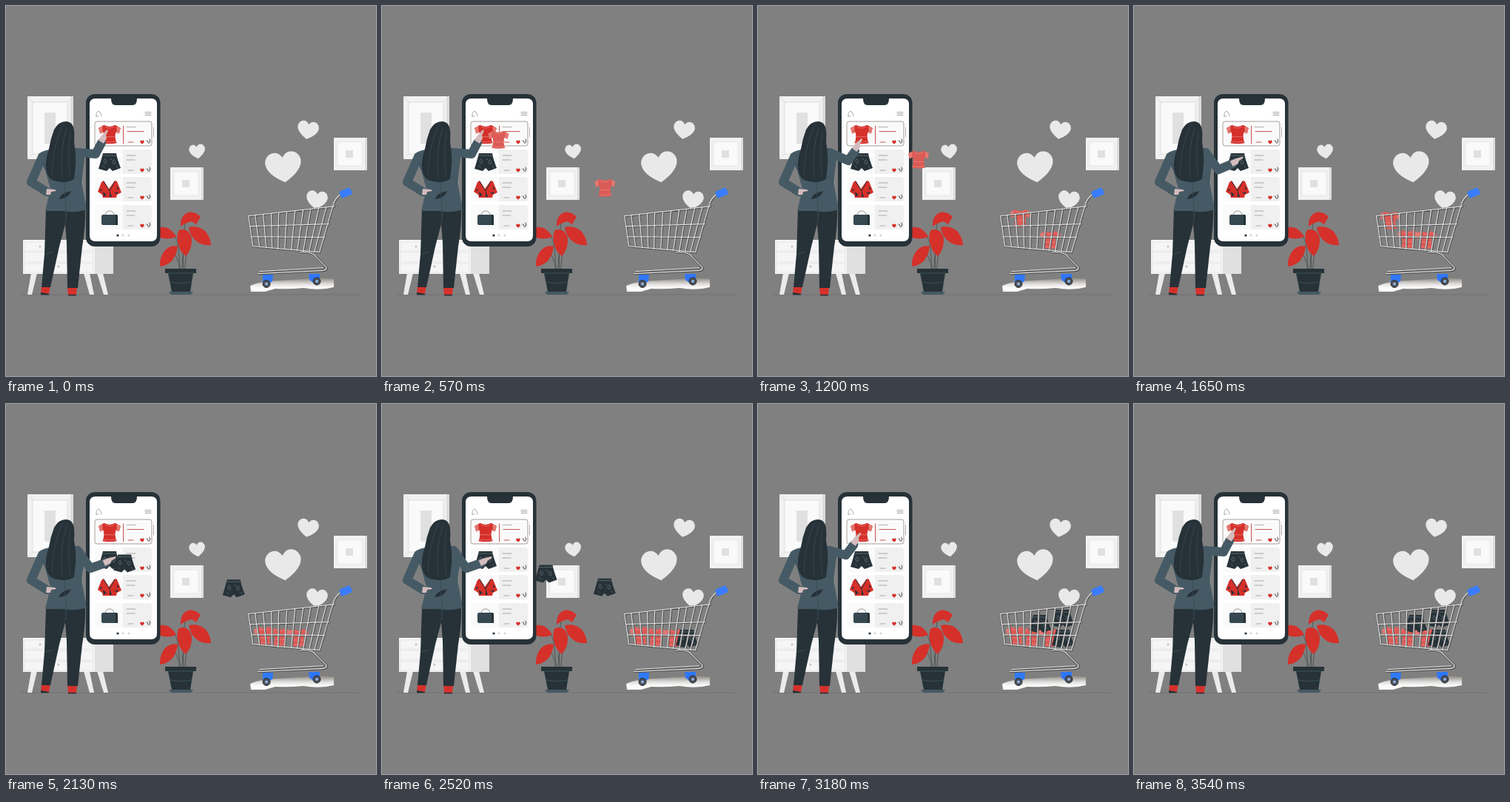
These frames come from a looping animation (500 px wide and 500 px high, 4.53 s). An HTML page without scripts:

```html
<!DOCTYPE html>
<html lang="en">
<head>
<meta charset="utf-8">
<title>Shopping from a phone</title>
<style>
html, body { margin: 0; width: 100%; height: 100%; overflow: hidden; background: #808080; }
svg { display: block; width: 100vw; height: 100vh; }
.dark { fill: #263238; }
.red { fill: #d5302a; }
.pale { fill: #e9e9e9; }
.frame { fill: #f1f1f1; }
.line { fill: none; stroke-linecap: round; stroke-linejoin: round; }
.sleeve { stroke: #455a64; stroke-width: 12; }
.under { stroke: #484848; stroke-width: 2.5; }
.over { stroke: #dedede; stroke-width: 1.3; }
.skin { fill: #d3bcbd; }
</style>
</head>
<body>
<svg viewBox="0 0 500 500" xmlns="http://www.w3.org/2000/svg">
<defs>
  <linearGradient id="shade" x2="0" y2="1">
    <stop offset="0" stop-color="#8c8782"/>
    <stop offset=".45" stop-color="#e2e0de"/>
    <stop offset=".7" stop-color="#fafafa"/>
  </linearGradient>
  <path id="heart" d="M0 10C-7 6-11.500 1-11-4C-10-10-3-12 0-6C3-12 10-10 11-4C11.500 1 7 6 0 10Z"/>
  <g id="shirt">
    <path d="M-14-8L-7-12Q0-8 7-12L14-8L12-1L8-3Q6 4 9 11Q0 13-9 11Q-6 4-8-3L-12-1Z"/>
    <path d="M-14-8L-9-11L-9-3L-12-1ZM14-8L9-11L9-3L12-1Z" fill="#e57973"/>
    <path class="line" d="M-6-10Q0-6 6-10M-7 3H7M-8 9Q0 11 8 9" stroke="#f08d88" stroke-width=".6"/>
  </g>
  <g id="shorts">
    <path class="dark" d="M-9-12H9Q10-5 15 8L4 12L0 8L-4 12L-15 9Q-11-4-9-12Z"/>
    <path class="line" d="M-9-9H9M-6-4l2 3-2 3-2-3zM6-3l2 3-2 3-2-3zM-9 5l2 2M1-5l2 2M9 5l2 2" stroke="#78878e" stroke-width=".6"/>
  </g>
  <g id="picture">
    <path class="frame" d="M0 0H45V44H0Z"/>
    <path d="M42 0H45V44H42Z" fill="#dcdcdc"/>
    <path d="M5 6H38V38H5Z" fill="#fafafa" stroke="#e0e0e0" stroke-width=".7"/>
    <path d="M16 17H26V27H16Z" fill="#e0e0e0"/>
  </g>
  <g id="card">
    <rect width="77" height="33" rx="3" fill="#fafafa"/>
    <path d="M38 0H74Q77 0 77 3V30Q77 33 74 33H38Z" fill="#f0f0f0"/>
    <path class="line" d="M43 8H55M43 14H54M45 28H52" stroke="#999" stroke-width=".8"/>
    <use href="#heart" class="red" transform="translate(64 28) scale(.25)"/>
    <path class="line" d="M70 26h1l1 3h2l1-3M74 24v2" stroke="#333" stroke-width=".8"/>
  </g>
  <path id="cart" class="line" d="M328 284L444 271M330 298L437 295M332 312L431 313M334 325L424 333M328 284L334 325
    M337 283L343 326M348 282L352 327M359 281L360 328M369 280L368 329M380 278L377 329M391 277L386 330M402 276L394 331M412 275L402 332M423 274L410 332M433 273L417 333
    M454 254Q445 259 442 271L424 333M398 333Q414 332 419 339L433 353Q435 358 427 358L341 362M343 359L429 354"/>
</defs>

<path d="M20 390H478" stroke="#6d6d6d" stroke-width=".8"/>

<g id="wall">
  <path class="frame" d="M29 122H91V207H29Z"/>
  <path d="M87 122H91V207H87Z" fill="#dcdcdc"/>
  <path d="M36 130H83V200H36Z" fill="#fafafa" stroke="#dedede"/>
  <path d="M29 122L36 130M91 122L83 130M29 207L36 200" stroke="#dedede"/>
  <path d="M52 144H67V186H52Z" fill="#e0e0e0"/>
  <use href="#picture" x="222" y="218"/>
  <use href="#picture" x="443" y="178"/>
  <g class="pale">
    <use href="#heart" transform="translate(258.500 196.500) rotate(-8) scale(.98)"/>
    <use href="#heart" transform="translate(375 217.500) rotate(-6) scale(2.200 2.080)"/>
    <use href="#heart" transform="translate(408 167.500) rotate(9) scale(1.300 1.230)"/>
    <use href="#heart" transform="translate(420 262) rotate(7) scale(1.300 1.250)"/>
  </g>
</g>

<g id="cabinet">
  <path d="M34 361H42L35 390H29ZM105 361H113L119 390H113ZM123 361H131L138 390H132Z" fill="#ebebeb"/>
  <path d="M23 316H121V362H23Z" fill="#f5f5f5"/>
  <path d="M120 316H145V362H120Z" fill="#e0e0e0"/>
  <path class="line" d="M25 319H118V331H25ZM25 333H118V346H25ZM25 348H118V360H25Z" stroke="#dedede" stroke-width=".7"/>
  <g fill="#c4c4c4"><circle cx="46" cy="325" r="1.500"/><circle cx="71" cy="352" r="1.500"/></g>
</g>

<g id="plant">
  <path class="line" d="M234 355Q235 325 229 312M238 355Q238 340 241 325M242 355Q243 320 254 306M236 355Q232 338 224 331M240 355Q238 318 242 294" stroke="#46504f" stroke-width=".8"/>
  <g class="red">
    <path d="M236 298C235 280 250 272 263 285L261 288L257 295L251 291Q242 293 236 298Z"/>
    <path d="M247 299C260 296 275 302 277 323C261 325 249 314 247 299Z"/>
    <path d="M233 304C240 299 251 304 251 318Q251 329 243 338C233 331 229 315 233 304Z"/>
    <path d="M232 325C221 321 207 332 208 352C223 350 230 340 232 325Z"/>
    <path d="M203 300Q221 295 230 312Q215 318 204 310Z"/>
  </g>
  <path d="M220 386H253L250 390H223Z" fill="#455a64"/>
  <path class="dark" d="M215 355H257V361H253L249 386H224L219 361H215Z"/>
  <path d="M222 373Q236 376 251 373M219 361H253" class="line" stroke="#455a64" stroke-width=".8"/>
</g>

<g id="phone">
  <rect class="dark" x="108" y="119" width="100.500" height="206" rx="12"/>
  <path d="M121 125H142Q142 134 148 134H171Q177 134 177 125H196Q204 125 204 133V310Q204 318 196 318H121Q113 318 113 310V133Q113 125 121 125Z" fill="#fff"/>
  <path class="line" d="M122 149V145Q125 139 128 145L129 149M125 149h-3M188 143.500H196M188 145.500H196M188 147.500H196" stroke="#777" stroke-width=".6"/>
  <use href="#card" x="120" y="156"/>
  <use href="#card" x="120" y="194"/>
  <use href="#card" x="120" y="231"/>
  <use href="#card" x="120" y="269"/>
  <rect x="120" y="156" width="77" height="33" rx="3" fill="#fafafa" stroke="#857775" stroke-width=".7"/>
  <path class="line" d="M163 163.500H175" stroke="#999" stroke-width=".8"/>
  <path class="line" d="M158.500 162V186M164 169.500H186M165 184H172" stroke="#c2423d" stroke-width=".9"/>
  <use href="#heart" class="red" transform="translate(184 184) scale(.25)"/>
  <path class="line" d="M190 182h1l1 3h2l1-3M194 180v2" stroke="#333" stroke-width=".8"/>
  <path class="line" d="M199.500 164V177" stroke="#999" stroke-width=".8"/>
  <use href="#shirt" class="red" transform="translate(140 173.500) scale(1.060)"/>
  <use href="#shorts" x="140" y="211"/>
  <g id="kimono">
    <path class="red" d="M132 236L139 247L147 236L150 237L156 252L150 255L149 259H131L130 255L124 251L129 238Z"/>
    <path class="dark" d="M131 251l5 4-4 3zM146 253l5-2v3zM127 247l3 1-2 3zM140 249l3 9h-3zM150 244l3 3-3 1z"/>
    <path class="line" d="M132 237L140 250L147 237" stroke="#263238"/>
  </g>
  <path class="line" d="M134 283Q134 277 140 277Q146 277 146 283" stroke="#777" stroke-width=".8"/>
  <rect x="129" y="282" width="22" height="14" rx="2" fill="#37474f"/>
  <path class="dark" d="M148 282H150Q151.500 283 151 296H148Z"/>
  <circle class="dark" cx="151" cy="310" r="1.600"/>
  <g fill="#d3d3d3"><circle cx="158" cy="310" r="1.400"/><circle cx="166" cy="310" r="1.400"/></g>
</g>

<path d="M330 378Q345 371 371 371L402 369Q425 366 443 369V380Q424 385 402 381Q382 383 364 382L350 386L331 386Z" fill="url(#shade)"/>

<!-- each item waits off stage, flies to the cart, then drops into place -->
<g id="items">
  <g fill="#db5b56">
    <use href="#shirt"><animateMotion dur="4.53s" repeatCount="indefinite" calcMode="linear" keyTimes="0;.0132;.0132;.1545;.1766;1" values="-99,0;-99,0;140,173;342,264;395,316;395,316"/></use>
    <use href="#shirt"><animateMotion dur="4.53s" repeatCount="indefinite" calcMode="linear" keyTimes="0;.1139;.1139;.2552;.2773;1" values="-99,0;-99,0;140,173;342,264;370,315;370,315"/></use>
    <use href="#shirt"><animateMotion dur="4.53s" repeatCount="indefinite" calcMode="linear" keyTimes="0;.2115;.2115;.3528;.3749;1" values="-99,0;-99,0;140,173;343,264;349,313;349,313"/></use>
  </g>
  <use href="#shorts"><animateMotion dur="4.53s" repeatCount="indefinite" calcMode="linear" keyTimes="0;.3678;.3678;.4914;.5135;1" values="-99,0;-99,0;140,211;342,257;412,317;412,317"/></use>
  <use href="#shorts"><animateMotion dur="4.53s" repeatCount="indefinite" calcMode="linear" keyTimes="0;.4581;.4581;.5817;.6038;1" values="-99,0;-99,0;140,211;342,257;381,297;381,297"/></use>
  <use href="#shorts"><animateMotion dur="4.53s" repeatCount="indefinite" calcMode="linear" keyTimes="0;.5066;.5066;.6302;.6523;1" values="-99,0;-99,0;140,211;342,257;412,290;412,290"/></use>
</g>

<g id="trolley">
  <use href="#cart" class="under"/>
  <use href="#cart" class="over" x="-.4" y="-.4"/>
  <rect x="-8" y="-5" width="16" height="10" rx="2.500" transform="translate(459 252.500) rotate(-24)" fill="#397cff"/>
  <path d="M347 363H361L360 372L353 376L347 372ZM409 362H424V370L417 375L410 370Z" fill="#2f78f8"/>
  <g fill="#4b4f55" stroke="#2d3034">
    <circle cx="352" cy="375.500" r="5"/><circle cx="420" cy="372" r="5"/>
  </g>
  <g fill="#8fb0e4"><circle cx="352" cy="375.500" r="2"/><circle cx="420" cy="372" r="2"/></g>
</g>

<g id="woman">
  <path class="red" d="M48 378H60L58 389H47ZM83 380H96L95 390H84Z"/>
  <path class="dark" d="M47 387L58 389V390.500H47ZM84 390H95V391.500H84ZM54 275H107Q108 295 103 325L97 381H83L82 320L80 295L72 325L60 380H48L52 335Z"/>
  <path class="line" d="M80 293Q82 284 81 278M54 335L64 332" stroke="#455a64" stroke-width=".7"/>
  <path class="line sleeve" d="M49 204L34 238L55 251"/>
  <path d="M44 200Q50 195 60 194L95 192Q104 195 106 207L102 238L109 275Q95 280 77 277L53 277L60 247L53 222Z" fill="#455a64"/>
  <path class="skin" d="M55 247L66 248L68 250L61 251L60 255L54 255Z"/>
  <path class="dark" d="M71 261Q75 252 88 250Q84 261 71 261Z"/>
  <path class="line" d="M79 237L81 277M102 238L95 230M54 222L50 211" stroke="#344750" stroke-width=".7"/>
  <path class="line sleeve" d="M97 198L121 200L129 185">
    <animate attributeName="d" dur="4.53s" repeatCount="indefinite" keyTimes="0;.2384;.2649;.3179;.4702;.5828;.6358;.7285;1"
      values="M97 198L121 200L129 185;M97 198L121 200L129 185;M97 198L122 209L131 196;M97 198L114 221L133 212;M97 198L114 222L134 215;M97 198L114 222L134 215;M97 198L113 215L130 204;M97 198L121 200L129 185;M97 198L121 200L129 185"/>
  </path>
  <g>
    <animateTransform attributeName="transform" type="translate" dur="4.53s" repeatCount="indefinite" keyTimes="0;.2384;.2649;.3179;.4702;.5828;.6358;.7285;1"
      values="130 181;130 181;132 192;134 211;135 214;135 214;131 202;130 181;130 181"/>
    <path class="skin" d="M-3-4L5-4L15-2V0L8 1L5 4L-3 4Z">
      <animateTransform attributeName="transform" type="rotate" dur="4.53s" repeatCount="indefinite" keyTimes="0;.2384;.2649;.3179;.4702;.5828;.6358;.7285;1"
        values="-58;-58;-52;-27;-24;-24;-38;-58;-58"/>
    </path>
  </g>
  <path class="dark" d="M81 156C93 156 93 170 92 184Q95 202 94 215L92 234Q82 240 69 237Q55 235 54 219Q53 207 58 193Q60 180 65 167Q71 156 81 156Z"/>
  <path class="line" d="M76 162Q63 190 62 228M82 164Q72 196 76 234M87 170Q82 200 87 232" stroke="#435159" stroke-width=".6"/>
</g>
</svg>
</body>
</html>
```
